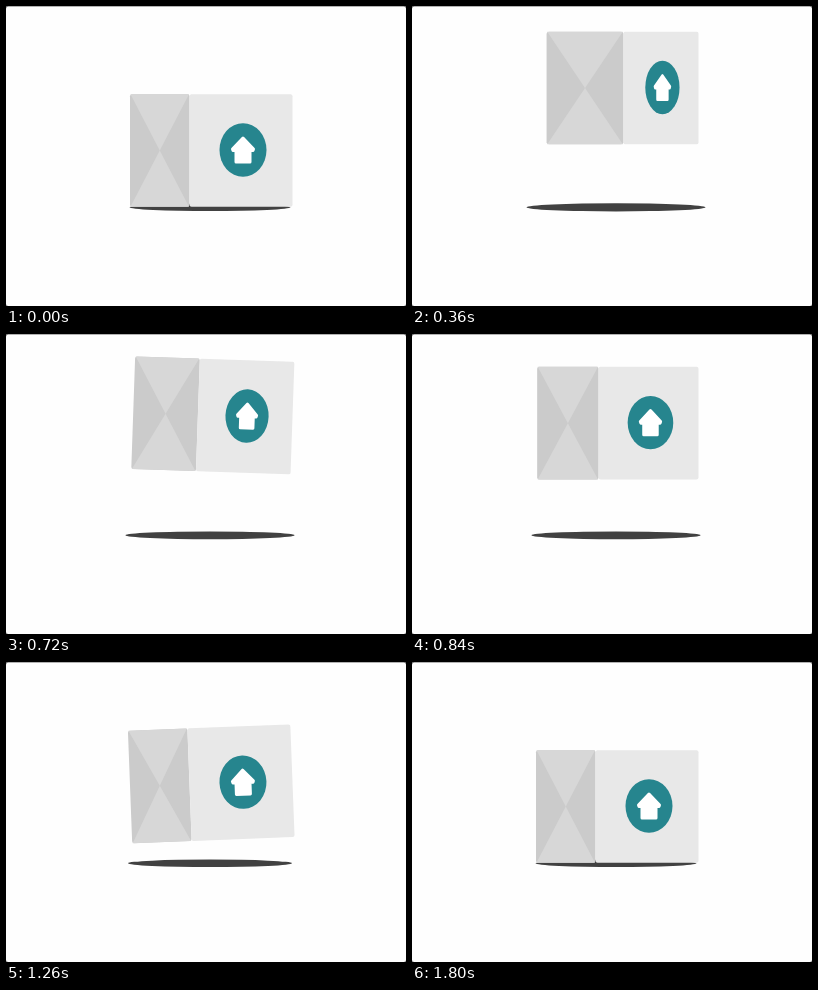
Animation, 400 px wide and 300 px high, one loop 1.83 s. Source, as an HTML page:

```html
<!DOCTYPE html>
<html lang="en">
<head>
<meta charset="utf-8">
<title>Bouncing parcel</title>
<style>
html, body { margin: 0; width: 100%; height: 100%; overflow: hidden; background: #666; }
svg { display: block; width: 100%; height: 100%; }
</style>
</head>
<body>
<svg viewBox="0 0 400 300">
  <rect y=".5" width="400" height="299.5" rx="2.5" fill="#fefefe"/>
  <ellipse id="shadow" cx="204" cy="201.3" fill="#414141"/>
  <g id="box">
    <g id="side">
      <rect x="-60" y="-56.3" width="60" height="112.6" rx="2" fill="#cbcbcb"/>
      <path d="M-59.5-56.3H-.5L-30 0ZM-59.5 56.3H-.5L-30 0Z" fill="#d7d7d7"/>
    </g>
    <g id="front">
      <rect y="-56.3" width="103" height="112.6" rx="2" fill="#e8e8e8"/>
      <ellipse cx="53.5" cy="-.5" rx="23.5" ry="26.7" fill="#26858e"/>
      <path d="M53.5-12.5L64-1.5 63.5 0H60.5V11.5H46.5V0H43.5L43-1.5Z" fill="#fff" stroke="#fff" stroke-width="3" stroke-linejoin="round"/>
    </g>
  </g>
</svg>
<script>
const LOOP = 1830, STEP = 30, START = 30, PEAK = 470, LAND = 1500;
const $ = id => document.getElementById(id);
const shadow = $('shadow'), box = $('box'), side = $('side'), front = $('front');
const clamp = v => Math.min(1, Math.max(0, v));
const mix = (a, b, k) => a + (b - a) * k;

// time, half width of the shadow
const spread = [[210, 0], [330, 88], [390, 91], [480, 89], [540, 87.5],
  [600, 84.5], [1080, 84.5], [1260, 82], [1500, 80.5]];

// start, end, angle in degrees of each swing
const swings = [[30, 360, -.8], [360, 840, 2.8], [840, 1500, -2.4]];

function shadowRadius(t) {
  if (t <= spread[0][0]) return 0;
  const i = spread.findIndex(p => p[0] >= t);
  if (i < 0) return spread.at(-1)[1];
  const [t0, r0] = spread[i - 1], [t1, r1] = spread[i];
  return mix(r0, r1, (t - t0) / (t1 - t0));
}

function height(t) {
  if (t < PEAK) return 67.5 + 287 * ((PEAK - t) / (PEAK - START)) ** 2.154;
  const u = clamp((t - PEAK) / (LAND - PEAK));
  return 67.5 + 77 * u * (.66 + .34 * u);
}

function tilt(t) {
  const s = swings.find(([a, b]) => t >= a && t < b);
  return s ? s[2] * Math.sin(Math.PI * (t - s[0]) / (s[1] - s[0])) : 0;
}

function draw(t) {
  if (t < START) t = LOOP; // the loop opens on the resting pose
  const u = clamp((t - 150) / 850), turn = u * u * (3 - 2 * u);
  const left = mix(80, 59.5, turn), right = mix(70, 103, turn);
  const half = (left + right) / 2, seam = left - half;
  box.setAttribute('transform', `translate(${286.5 - half} ${height(t)}) rotate(${tilt(t)})`);
  side.setAttribute('transform', `translate(${seam}) scale(${left / 60} 1)`);
  front.setAttribute('transform', `translate(${seam}) scale(${right / 103} 1)`);
  const r = shadowRadius(t);
  shadow.setAttribute('rx', r);
  shadow.setAttribute('ry', r * .046);
}

const begin = performance.now();
function tick() {
  const t = (performance.now() - begin) % LOOP;
  draw(Math.floor(t / STEP) * STEP);
  requestAnimationFrame(tick);
}
tick();
</script>
</body>
</html>
```
